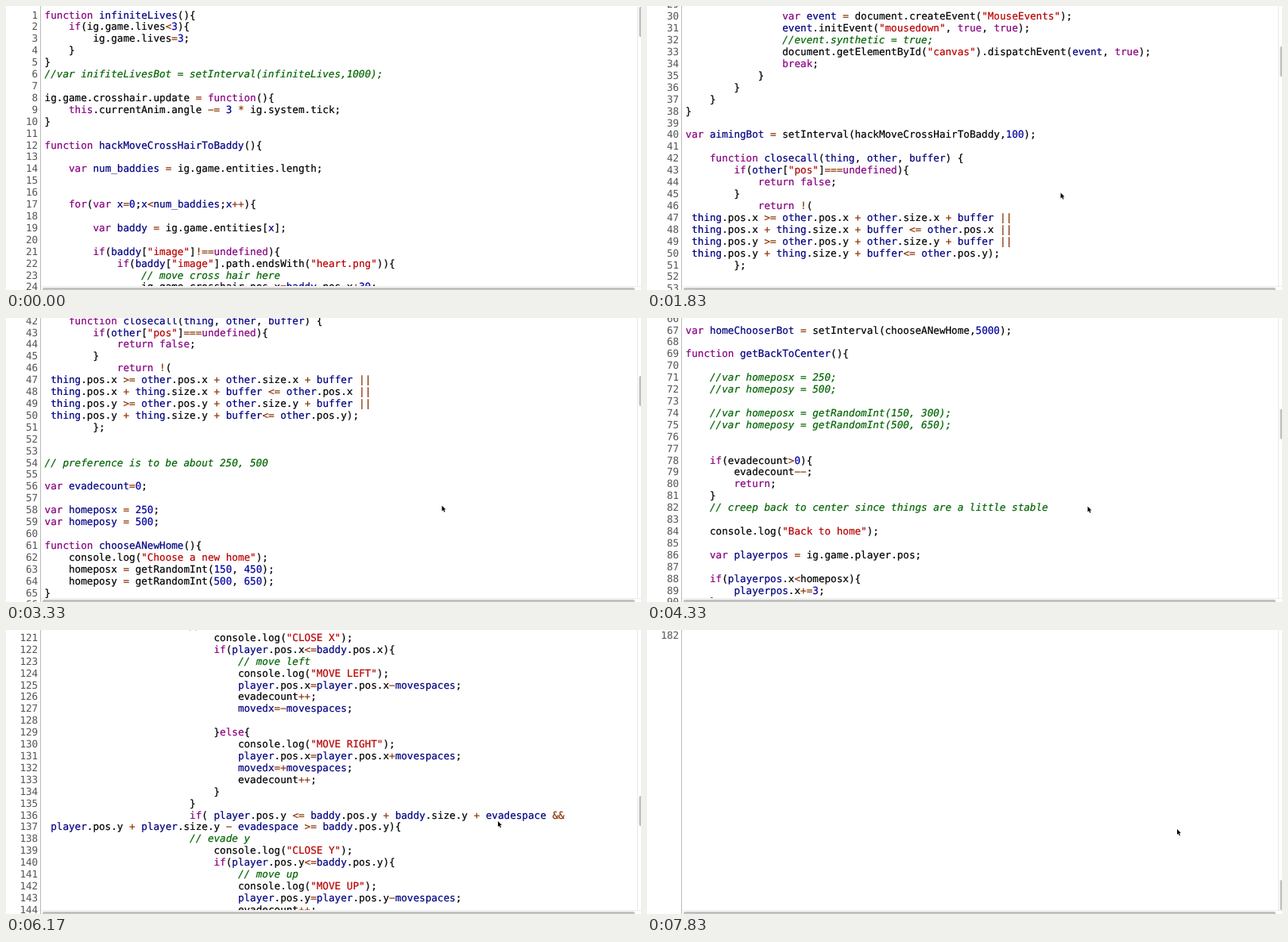
An HTML page for the animation above (8000 ms loop, 799 by 358 pixels).

```html
<!DOCTYPE html>
<html lang="en">
<head>
<meta charset="utf-8">
<title>Scrolling code</title>
<style>
  html, body { margin: 0; width: 100%; height: 100%; overflow: hidden; background: #fff; }
  svg { display: block; width: 799px; height: 358px; }
  text { font: 12.63px "DejaVu Sans Mono", monospace; text-rendering: geometricPrecision; color: #000; }
  text, tspan { fill: currentColor; stroke: currentColor; stroke-width: 0.2px; }
  .gutter text { color: #555; text-anchor: end; stroke: none; }
  .keyword, .atom { color: #880080; }
  .local { color: #000080; }
  .number { color: #0000a0; }
  .string { color: #b80000; }
  .comment { color: #006400; font-style: italic; }
  .operator { color: #8b3000; }
</style>
</head>
<body>
<svg viewBox="0 0 799 358">
  <defs><clipPath id="pane"><rect x="44" width="750" height="353"/></clipPath></defs>
  <rect width="799" height="358" fill="#fff"/>
  <g class="gutter"><g id="numbers"></g></g>
  <g clip-path="url(#pane)"><g id="code"></g></g>
  <rect x="43" width="1" height="358" fill="#bbb"/>
  <rect x="44" y="353" width="755" height="1" fill="#ececec"/>
  <rect x="794" width="1" height="353" fill="#e8e8e8"/>
  <rect x="46" y="355" width="745" height="5" rx="2" fill="#c1c1c1"/>
  <rect id="thumb" x="796.5" y="1" width="5" height="38" rx="2" fill="#c1c1c1"/>
  <path id="cursor" d="M0 0V7L1.6 5.5L2.8 8.2L3.9 7.7L2.8 5.1H4.9Z" fill="#000" stroke="#fff" stroke-width="1" paint-order="stroke"/>
</svg>
<script>
const source = `function infiniteLives(){
    if(ig.game.lives<3){
        ig.game.lives=3;
    }
}
//var inifiteLivesBot = setInterval(infiniteLives,1000);

ig.game.crosshair.update = function(){
    this.currentAnim.angle -= 3 * ig.system.tick;
}

function hackMoveCrossHairToBaddy(){

    var num_baddies = ig.game.entities.length;


    for(var x=0;x<num_baddies;x++){

        var baddy = ig.game.entities[x];

        if(baddy["image"]!==undefined){
            if(baddy["image"].path.endsWith("heart.png")){
                // move cross hair here
                ig.game.crosshair.pos.x=baddy.pos.x+30;
                ig.game.crosshair.pos.y=baddy.pos.y+30;


                // fire a mouse event

                var event = document.createEvent("MouseEvents");
                event.initEvent("mousedown", true, true);
                //event.synthetic = true;
                document.getElementById("canvas").dispatchEvent(event, true);
                break;
            }
        }
    }
}

var aimingBot = setInterval(hackMoveCrossHairToBaddy,100);

    function closecall(thing, other, buffer) {
        if(other["pos"]===undefined){
            return false;
        }
            return !(
 thing.pos.x >= other.pos.x + other.size.x + buffer ||
 thing.pos.x + thing.size.x + buffer <= other.pos.x ||
 thing.pos.y >= other.pos.y + other.size.y + buffer ||
 thing.pos.y + thing.size.y + buffer<= other.pos.y);
        };


// preference is to be about 250, 500

var evadecount=0;

var homeposx = 250;
var homeposy = 500;

function chooseANewHome(){
    console.log("Choose a new home");
    homeposx = getRandomInt(150, 450);
    homeposy = getRandomInt(500, 650);
}

var homeChooserBot = setInterval(chooseANewHome,5000);

function getBackToCenter(){

    //var homeposx = 250;
    //var homeposy = 500;

    //var homeposx = getRandomInt(150, 300);
    //var homeposy = getRandomInt(500, 650);


    if(evadecount>0){
        evadecount--;
        return;
    }
    // creep back to center since things are a little stable

    console.log("Back to home");

    var playerpos = ig.game.player.pos;

    if(playerpos.x<homeposx){
        playerpos.x+=3;
    }
    if(playerpos.x>homeposx){
        playerpos.x-=3;
    }
    if(playerpos.y>homeposy){
        playerpos.y-=3;
    }
    if(playerpos.y<homeposy){
        playerpos.y+=3;
    }
}

var entropyBot = setInterval(getBackToCenter,50);

function moveplayer(){
    var evadespace = 15; //10
    var movespaces = 5;
    var num_baddies = ig.game.entities.length;
    var player = ig.game.player;
    var movedx = 0;
    var movedy = 0;

    for(var x=0;x<num_baddies;x++){
        var baddy = ig.game.entities[x];

            if(baddy["pos"]!==undefined){
                if(baddy!==player){
                    if(closecall(player, baddy, evadespace)){
                        if( player.pos.x <= baddy.pos.x + baddy.size.x + evadespace &&
 player.pos.x + player.size.x - evadespace >= baddy.pos.x){
                        // evade x
                            console.log("CLOSE X");
                            if(player.pos.x<=baddy.pos.x){
                                // move left
                                console.log("MOVE LEFT");
                                player.pos.x=player.pos.x-movespaces;
                                evadecount++;
                                movedx=-movespaces;

                            }else{
                                console.log("MOVE RIGHT");
                                player.pos.x=player.pos.x+movespaces;
                                movedx=+movespaces;
                                evadecount++;
                            }
                        }
                        if( player.pos.y <= baddy.pos.y + baddy.size.y + evadespace &&
 player.pos.y + player.size.y - evadespace >= baddy.pos.y){
                        // evade y
                            console.log("CLOSE Y");
                            if(player.pos.y<=baddy.pos.y){
                                // move up
                                console.log("MOVE UP");
                                player.pos.y=player.pos.y-movespaces;
                                evadecount++;
                                movedy=-movespaces;

                            }else{
                                console.log("MOVE DOWN");
                                player.pos.y=player.pos.y+movespaces;
                                movedy=+movespaces;
                                evadecount++;
                            }
                        }
                    }
                }
            }
    }
}

var evadeBot = setInterval(moveplayer,50);

function getRandomInt(min, max) {
    return Math.floor(Math.random() * (max - min + 1)) + min;
}

function stopBots(){
    clearInterval(aimingBot);
    clearInterval(homeChooserBot);
    clearInterval(entropyBot);
    clearInterval(evadeBot);
}`;

const LINES = 182, PITCH = 14.91, BASELINE = 15.5, LEFT = 48.6, ADVANCE = 7.604;
const LOOP = 8000, FPS = 6;

// time, scroll offset, cursor x, cursor y
const steps = [
  [0, 0, 520.5, 235.5],
  [1170, 0, 520.5, 235.5],
  [1830, 430.5, 520.5, 235.5],
  [2330, 525, 530, 236],
  [3330, 619.2, 548.5, 236.5],
  [4330, 980, 554.5, 237.5],
  [5170, 1240.2, 556, 238],
  [6170, 1790.8, 619, 241],
  [7830, 2703.7, 667, 251]
];

const words = list => new Set(list.split(" "));
const keywords = words("function var if else for return break this");
const atoms = words("undefined true false");
const locals = words("x num_baddies baddy event thing other buffer player playerpos " +
  "evadespace movespaces movedx movedy min max");
const tokenPattern = /\/\/.*|"[^"]*"|[A-Za-z_]\w*|\d+|[-+*=<>!&|]+|\s+|./g;

function classify(token, before) {
  if (token.startsWith("//")) return "comment";
  if (token[0] === '"') return "string";
  if (/^\d/.test(token)) return "number";
  if (/^[-+*=<>!&|]/.test(token)) return "operator";
  if (before.endsWith(".")) return "";
  if (keywords.has(token)) return "keyword";
  if (atoms.has(token)) return "atom";
  return locals.has(token) || /\b(var|function) $/.test(before) ? "local" : "";
}

// Operators use the wide minus sign.
const display = token => token.replace(/^[-+*=<>!&|]+$/, op => op.replaceAll("-", "\u2212"));

function add(parent, tag, attributes, content = "") {
  const node = document.createElementNS("http://www.w3.org/2000/svg", tag);
  for (const name in attributes) node.setAttribute(name, attributes[name]);
  node.textContent = content;
  return parent.appendChild(node);
}

const [numbers, code, thumb, cursor] =
  ["numbers", "code", "thumb", "cursor"].map(id => document.getElementById(id));

const sourceLines = source.split("\n");
for (let i = 0; i < LINES; i++) {
  const y = BASELINE + i * PITCH;
  add(numbers, "text", { x: 40.2, y }, i + 1);
  const line = sourceLines[i] || "", body = line.trimStart();
  if (!body) continue;
  const row = add(code, "text", { x: LEFT + (line.length - body.length) * ADVANCE, y });
  for (const match of body.matchAll(tokenPattern))
    add(row, "tspan", { class: classify(match[0], body.slice(0, match.index)) }, display(match[0]));
}

function sample(time) {
  const next = steps.findIndex(step => step[0] > time);
  if (next < 0) return steps[steps.length - 1];
  const a = steps[next - 1], b = steps[next];
  const part = (time - a[0]) / (b[0] - a[0]);
  return a.map((value, i) => value + (b[i] - value) * part);
}

function draw(time) {
  const frame = Math.floor((time + 4) * FPS / 1000);
  const [, scroll, x, y] = sample(Math.round(frame * 100 / FPS) * 10);
  for (const layer of [numbers, code]) layer.setAttribute("transform", `translate(0 ${-scroll})`);
  thumb.setAttribute("y", 1 + scroll * 0.1161);
  cursor.setAttribute("transform", `translate(${x} ${y})`);
  cursor.setAttribute("visibility", frame ? "visible" : "hidden");
}

const start = performance.now();
function tick() {
  draw((performance.now() - start) % LOOP);
  requestAnimationFrame(tick);
}
tick();
</script>
</body>
</html>
```
